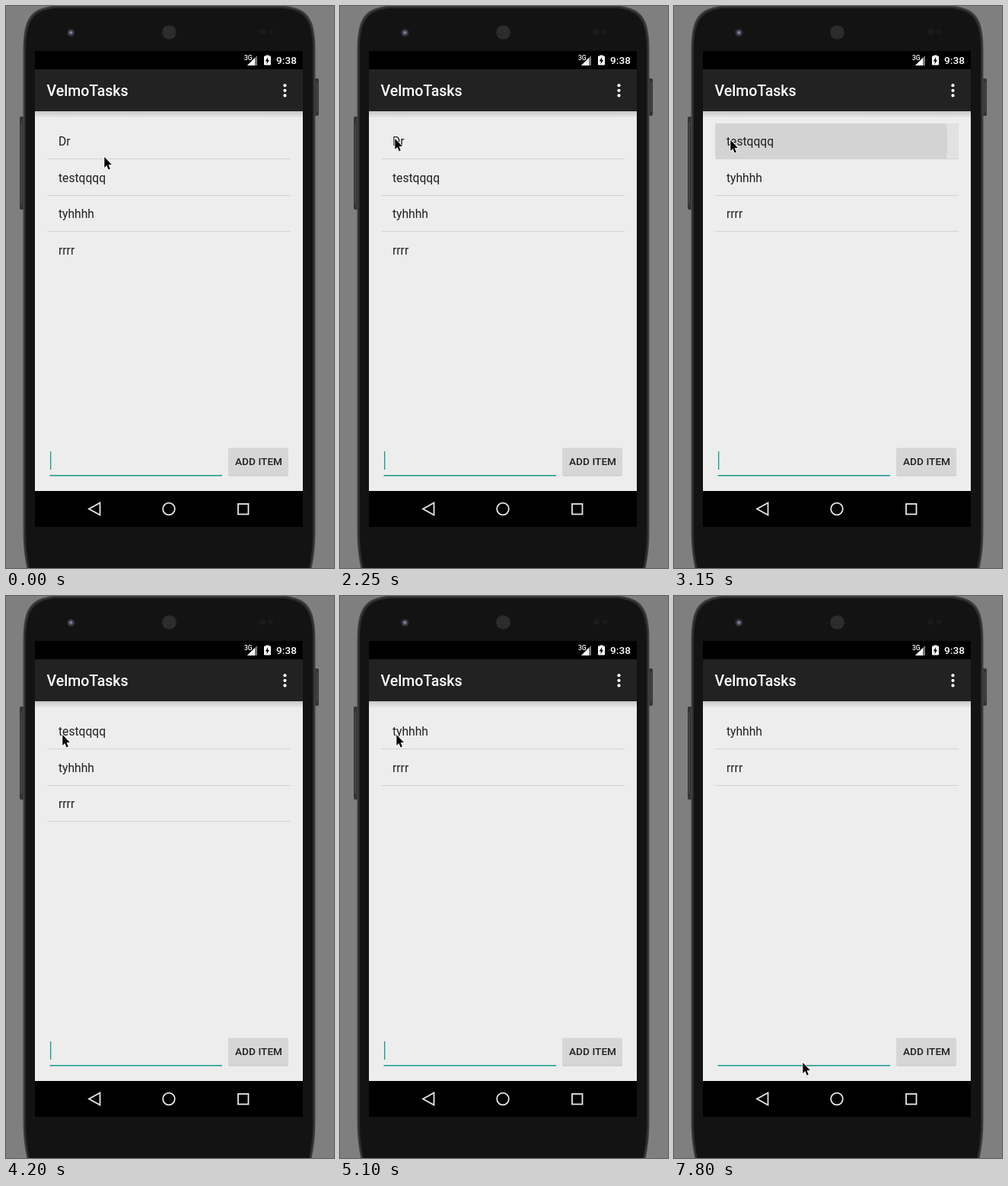
An HTML page with a canvas for the animation above (8 s loop, 431x737 px).

```html
<!DOCTYPE html>
<html lang="en">
<head>
<meta charset="utf-8">
<title>To-do list</title>
<style>
html, body { margin: 0; width: 100%; height: 100%; overflow: hidden; background: #7f7f7f; }
canvas { display: block; }
</style>
</head>
<body>
<canvas id="stage" width="431" height="737"></canvas>
<script>
const ctx = document.getElementById('stage').getContext('2d');
const LOOP = 8000, STEP = 150;
const BLINK = 505, BLINK_START = 50;
const HOLD = 600, FADE = 300;
const ROW = { x: 54, y: 154, w: 320, h: 47, pitch: 47.5 };
const TEAL = '#149a8d';
const ITEMS = ['Dr', 'testqqqq', 'tyhhhh', 'rrrr'];
const PRESSES = [{ start: 2550, y: 176 }, { start: 4200, y: 182 }];

// Pointer glides, each beginning where the last one ended
const HOME = { x: 129, y: 198 };
const GLIDES = [
  { from: 0, to: 300, x: 96, y: 182 },
  { from: 1800, to: 2250, x: 72, y: 174 },
  { from: 2400, to: 2550, x: 74, y: 176 },
  { from: 3450, to: 3600, x: 74, y: 182 },
  { from: 5400, to: 5850, x: 416, y: 515 },
  { from: 5850, to: 6450, x: 169, y: 612 }
];

const clamp = v => Math.min(1, Math.max(0, v));
const mix = (a, b, k) => a + (b - a) * k;
const smooth = k => k * k * (3 - 2 * k);

function rect(x, y, w, h, color) {
  ctx.fillStyle = color;
  ctx.fillRect(x, y, w, h);
}

function round(x, y, w, h, r, color) {
  ctx.fillStyle = color;
  ctx.beginPath();
  ctx.roundRect(x, y, w, h, r);
  ctx.fill();
}

function disc(x, y, r, color) {
  ctx.fillStyle = color;
  ctx.beginPath();
  ctx.arc(x, y, r, 0, Math.PI * 2);
  ctx.fill();
}

function poly(points, color) {
  ctx.beginPath();
  points.forEach(([x, y]) => ctx.lineTo(x, y));
  ctx.closePath();
  if (color) {
    ctx.fillStyle = color;
    ctx.fill();
  }
}

function text(str, x, y, size, color, weight = 400) {
  ctx.font = `${weight} ${size}px Roboto, sans-serif`;
  ctx.fillStyle = color;
  ctx.fillText(str, x, y);
}

function shell(inset, color) {
  const l = 22.5 + inset, r = 406.5 - inset, t = inset;
  ctx.fillStyle = color;
  ctx.beginPath();
  ctx.moveTo(27.5 + inset, 738);
  ctx.quadraticCurveTo(l, 715, l, 690);
  ctx.lineTo(l, 58);
  ctx.bezierCurveTo(l, 12 + t, 35 + t, 3 + t, 64, t - 0.5);
  ctx.lineTo(365, t - 0.5);
  ctx.bezierCurveTo(394 - t, 3 + t, r, 12 + t, r, 58);
  ctx.lineTo(r, 690);
  ctx.quadraticCurveTo(r, 715, 401.5 - inset, 738);
  ctx.fill();
}

function drawPhone() {
  rect(0, 0, 431, 737, '#7f7f7f');
  round(18, 145, 7, 122, 2, '#343434');
  rect(19, 153, 2, 106, '#444');
  round(404, 95, 7, 49, 2, '#343434');
  rect(408, 100, 2, 38, '#444');
  shell(0, '#424242');
  shell(1.5, '#2b2b2b');
  shell(3.5, '#131313');

  disc(85.3, 35, 5.3, '#2b2b31');
  disc(85.3, 35, 3.3, '#4b4c60');
  disc(85.3, 34.8, 1.5, '#8f90aa');
  disc(337, 34, 4, '#1c1a1a');
  disc(348, 34, 3, '#1b1a1a');

  disc(214.5, 34.5, 9.3, '#343434');
  for (let y = -8; y <= 8; y += 2.6) {
    for (let x = -8; x <= 8; x += 2.6) {
      if (Math.hypot(x, y) < 9) disc(214.5 + x, 34.5 + y, 0.8, '#191919');
    }
  }
}

function drawBars() {
  rect(38, 59, 352, 624, '#000');
  rect(38, 83, 352, 55, '#222');
  rect(38, 138, 352, 498, '#ededed');
  const shade = ctx.createLinearGradient(0, 138, 0, 146);
  shade.addColorStop(0, '#c8c8c8');
  shade.addColorStop(1, '#e7e7e7');
  rect(38, 138, 352, 8, shade);

  text('3G', 313, 71, 8.5, '#fff', 500);
  poly([[330, 65], [330, 78], [317, 78]], '#777');
  poly([[327, 68], [327, 78], [317, 78]], '#fff');
  rect(341.5, 64.5, 4, 2, '#fff');
  round(339, 65.5, 9, 12, 1, '#fff');
  poly([[344.2, 67], [340.8, 72.5], [343, 72.5], [342.4, 76.5], [346, 70.7], [344, 70.7]], '#000');
  text('9:38', 355, 76, 13.7, '#fff', 500);

  text('VelmoTasks', 53.5, 118, 19.56, '#fff', 500);
  for (let i = -1; i <= 1; i++) disc(366.5, 110.8 + i * 6.6, 2.1, '#fff');

  ctx.strokeStyle = '#e8e8e8';
  ctx.lineWidth = 1.8;
  poly([[109, 659.5], [123.5, 651.5], [123.5, 667.5]]);
  ctx.stroke();
  ctx.beginPath();
  ctx.arc(214, 659.5, 7.8, 0, Math.PI * 2);
  ctx.stroke();
  ctx.strokeRect(305, 653, 13.5, 13.5);
}

// The row darkens while a wave creeps out; on release it bursts and fades
function drawRipple(age, y) {
  if (age <= 0 || age >= HOLD + FADE) return;
  const held = age < HOLD;
  const strength = held ? clamp(age / 300) : 0.45 * (1 - (age - HOLD) / FADE);
  const spread = held ? age / 1900 : 0.945 + (age - HOLD) / 1000;
  const k = clamp(spread);
  ctx.save();
  ctx.beginPath();
  ctx.rect(ROW.x, ROW.y, ROW.w, ROW.h);
  ctx.clip();
  rect(ROW.x, ROW.y, ROW.w, ROW.h, `rgba(0,0,0,${0.105 * strength})`);
  disc(mix(75, 214, k), mix(y, 177.5, k), 162 * spread, `rgba(0,0,0,${0.146 * strength})`);
  ctx.restore();
}

function drawList(time) {
  const removed = PRESSES.filter(p => time >= p.start + HOLD).length;
  const rows = ITEMS.slice(removed);
  PRESSES.forEach(p => drawRipple(time - p.start, p.y));
  rows.forEach((row, i) => {
    if (i < ITEMS.length - 1) {
      rect(ROW.x, Math.round(200 + i * ROW.pitch), ROW.w, 1, '#d3d3d3');
    }
    text(row, 69, 183 + i * ROW.pitch, 15.64, '#202020');
  });
}

function drawForm(time) {
  rect(57.5, 615, 226.5, 1.5, TEAL);
  const toggles = Math.floor((time - BLINK_START) / BLINK);
  if (time < BLINK || toggles % 2 === 0) rect(58, 584, 1.3, 24, TEAL);
  round(292, 580, 79, 36.5, 2, '#c6c6c6');
  round(292, 579.5, 79, 36, 2, '#d5d6d5');
  text('ADD ITEM', 301, 602, 13.7, '#202020', 500);
}

function pointerAt(time) {
  return GLIDES.reduce((p, g) => {
    const k = smooth(clamp((time - g.from) / (g.to - g.from)));
    return { x: mix(p.x, g.x, k), y: mix(p.y, g.y, k) };
  }, HOME);
}

function drawPointer(time) {
  const { x, y } = pointerAt(time);
  ctx.save();
  ctx.translate(x + 0.3, y);
  poly([[0, 0], [0, 14], [3.1, 11.1], [5.3, 16.4], [7.5, 15.5], [5.3, 10.3], [9.6, 10]]);
  ctx.strokeStyle = '#fff';
  ctx.lineWidth = 1.6;
  ctx.stroke();
  ctx.fillStyle = '#000';
  ctx.fill();
  ctx.restore();
}

function render(now) {
  const time = Math.floor((now % LOOP) / STEP) * STEP;
  drawPhone();
  drawBars();
  drawList(time);
  drawForm(time);
  drawPointer(time);
}

const began = performance.now();
function tick() {
  render(performance.now() - began);
  requestAnimationFrame(tick);
}
tick();
</script>
</body>
</html>
```
